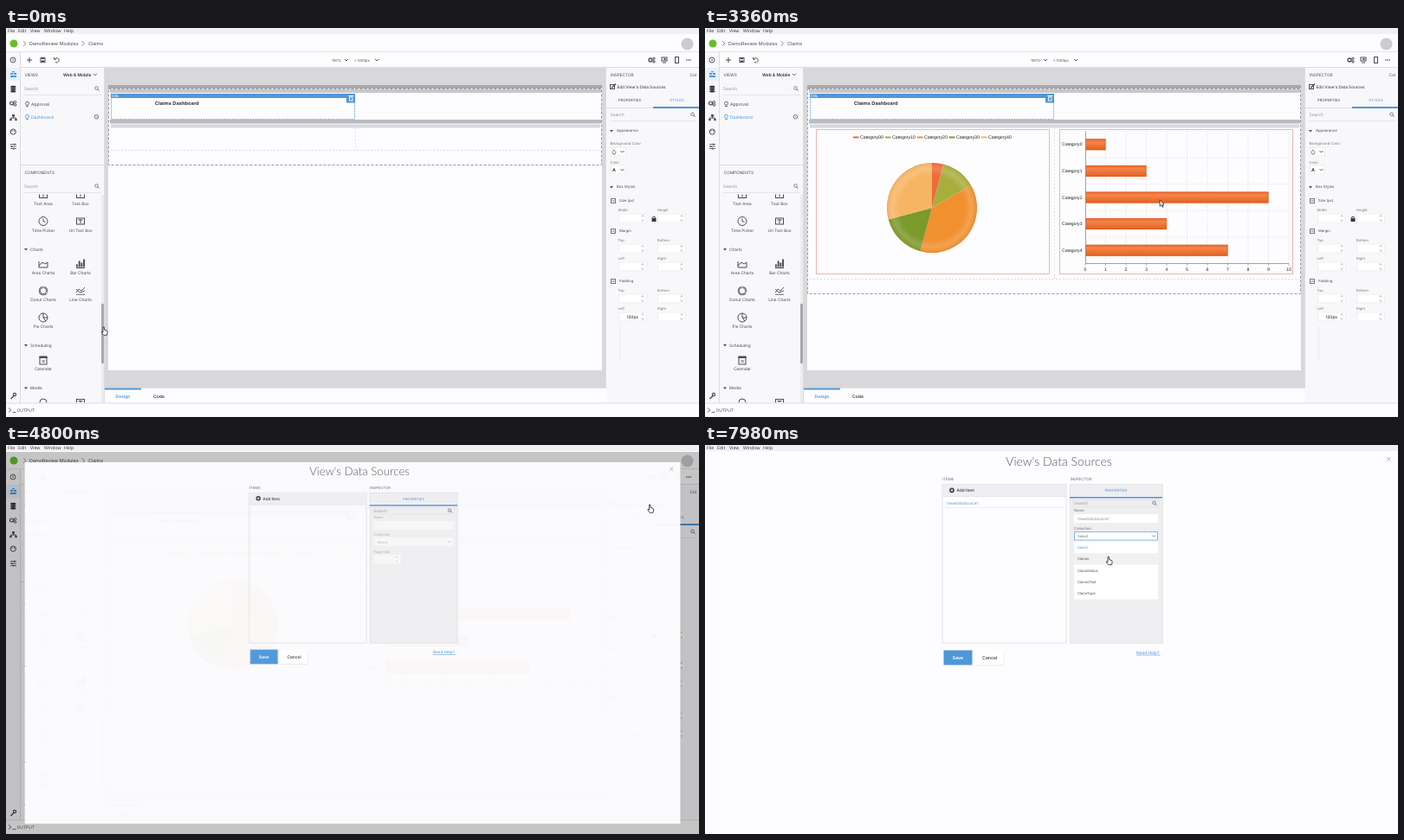
An HTML page with a canvas for the animation above (8 s loop, 800x450 px).

```html
<!DOCTYPE html>
<html lang="en">
<head>
<meta charset="utf-8">
<title>Claims dashboard builder</title>
<style>
html, body { margin: 0; width: 100%; height: 100%; overflow: hidden; background: #fdfcfe; }
canvas { display: block; width: 800px; height: 450px; }
</style>
</head>
<body>
<canvas id="stage" width="800" height="450"></canvas>
<script>
const c = document.getElementById('stage').getContext('2d');
const LOOP = 8000, STEP = 60, TAU = Math.PI * 2;
const BLUE = '#4f97d9', INK = '#4c4b50', MID = '#6b6a6f', SOFT = '#98979c', LINE = '#dddce0', PAPER = '#fdfcfe', PANEL = '#f8f7f9';
const UI = 'Inter, sans-serif', PLAIN = '"Liberation Sans", Arial, sans-serif';
c.textRendering = 'geometricPrecision';

// ---------- helpers ----------
function rect(x, y, w, h, fill) { c.fillStyle = fill; c.fillRect(x, y, w, h); }

function frame(x, y, w, h, col, dash = [], lw = 1) {
  c.strokeStyle = col; c.lineWidth = lw; c.setLineDash(dash);
  c.strokeRect(x + .5, y + .5, w - 1, h - 1);
  c.setLineDash([]);
}

function path(pts, col = INK, lw = 1, dash = []) {
  c.strokeStyle = col; c.lineWidth = lw; c.setLineDash(dash);
  c.beginPath();
  for (let i = 0; i < pts.length; i += 2) c.lineTo(pts[i], pts[i + 1]);
  c.stroke();
  c.setLineDash([]);
}

function disc(x, y, r, fill, stroke, lw = 1) {
  c.beginPath(); c.arc(x, y, r, 0, TAU);
  if (fill) { c.fillStyle = fill; c.fill(); }
  if (stroke) { c.strokeStyle = stroke; c.lineWidth = lw; c.stroke(); }
}

function text(s, x, y, size = 4.8, col = INK, align = 'left', weight = 400, font = UI) {
  c.font = `${weight} ${size}px ${font}`;
  c.textAlign = align; c.textBaseline = 'middle'; c.fillStyle = col;
  c.fillText(s, x, y + .2);
}

const down = (x, y, col = INK) => path([x - 2, y - 1, x, y + 1, x + 2, y - 1], col, .9);
const right = (x, y) => path([x - 1.5, y - 3, x + 1.5, y, x - 1.5, y + 3], '#77767a', .8);

function caret(x, y) {
  c.fillStyle = INK;
  c.beginPath(); c.moveTo(x - 2, y - 1); c.lineTo(x + 2, y - 1); c.lineTo(x, y + 1.4); c.fill();
}

function lens(x, y) {
  disc(x - .5, y - .5, 1.8, null, '#66656a', .8);
  path([x + .8, y + .8, x + 2.6, y + 2.6], '#66656a', .9);
}

function search(x, y, iconX) {
  text('Search', x, y, 4.9, SOFT);
  lens(iconX, y);
}

function spinner(x, y) {
  path([x - 1.5, y - 2, x, y - 3.3, x + 1.5, y - 2], '#8b8a8e', .7);
  path([x - 1.5, y + 2, x, y + 3.3, x + 1.5, y + 2], '#8b8a8e', .7);
}

function plusDisc(x, y) {
  disc(x, y, 2.9, '#38373b');
  path([x - 1.7, y, x + 1.7, y], '#fff', .8);
  path([x, y - 1.7, x, y + 1.7], '#fff', .8);
}

// ---------- shell ----------
function menuBar() {
  rect(0, 0, 800, 7, '#f0eff1');
  [['File', 2], ['Edit', 14], ['View', 28], ['Window', 44], ['Help', 67]]
    .forEach(([s, x]) => text(s, x, 3.2, 5.2, '#333', 'left', 400, '"Open Sans", sans-serif'));
}

function topBars() {
  rect(0, 8, 800, 37, PAPER);
  disc(9, 18, 4.5, '#67bf2b');
  right(21.5, 18); right(89, 18);
  text('DemoReview Modules', 27, 18, 5.4);
  text('Claims', 95, 18, 5.4);
  disc(786.5, 18.5, 7, '#cccbce');
  rect(0, 27, 800, 1, '#e4e3e6');
  rect(0, 45, 800, 1, LINE);
  path([24, 37, 30, 37]); path([27, 34, 27, 40]);
  frame(39.5, 34, 6, 6, INK); rect(41, 34, 3, 2, INK); rect(41, 37.5, 3, 2, INK);
  c.strokeStyle = INK; c.lineWidth = .9;
  c.beginPath(); c.arc(58.5, 37.3, 2.7, -2.6, 2.2); c.stroke();
  path([55.5, 33.8, 55.7, 36.3, 58, 36.3], INK, .9);
  text('100%', 376, 37.3, 4.2); down(393, 37);
  text('⌖ 1200px', 402, 37.3, 4.2); down(428, 37);
  disc(744, 37, 2, null, INK, 1.3); disc(748, 35.3, 1.2, null, INK); disc(748, 39, 1.2, null, INK);
  frame(756.5, 33.5, 7, 5, INK); rect(758, 39.5, 4, 1, INK); rect(759.5, 35, 2, 2, INK);
  frame(772, 33, 5, 8, INK);
  for (let i = 0; i < 3; i++) disc(785.8 + i * 2.2, 37, .8, INK);
}

function rail() {
  rect(0, 28, 17, 406, PANEL);
  rect(0, 46, 16, 15, '#e8f0f8');
  rect(16, 28, 1, 406, LINE);
  disc(8, 37, 3, null, INK, .9); text('?', 8, 37, 4.6, INK, 'center', 700);
  rect(5, 52, 3, 2, BLUE); rect(9, 52, 3, 2, BLUE); rect(5, 55, 7, 2, BLUE); rect(7, 50, 3, 1.3, BLUE);
  for (let i = 0; i < 3; i++) {
    c.fillStyle = '#38373b';
    c.beginPath(); c.ellipse(8.3, 68 + i * 2.6, 3.2, 1.3, 0, 0, TAU); c.fill();
  }
  disc(6.5, 87, 2, null, INK, 1.2); disc(10.5, 85.7, 1.3, null, INK); disc(10.5, 89, 1.3, null, INK);
  rect(7, 100, 3, 2.5, INK); path([8.5, 102, 8.5, 104]); path([5.5, 106, 5.5, 104, 11.5, 104, 11.5, 106]);
  rect(4.3, 105, 2.4, 2.2, INK); rect(10.3, 105, 2.4, 2.2, INK);
  disc(8.3, 120, 3.1, null, INK); disc(7, 119, .7, INK); disc(9.6, 119, .7, INK);
  for (let i = 0; i < 3; i++) {
    path([5, 134.5 + i * 2.5, 12, 134.5 + i * 2.5], INK, .8);
    rect([9, 6, 8][i], 133.7 + i * 2.5, 1.4, 1.8, INK);
  }
  path([5.5, 429, 9.5, 425], INK, 1.5); disc(10, 424, 1.6, null, INK, 1.2);
}

const ICONS = {
  area(x, y) { path([x - 5, y - 3, x - 5, y + 4, x + 5, y + 4, x + 5, y - 2, x + 2, y, x - 1, y - 2, x - 5, y + 2]); },
  bars(x, y) { [3, 7, 5, 9].forEach((h, i) => rect(x - 5 + i * 2.7, y + 3.5 - h, 1.9, h, INK)); path([x - 5, y + 4.5, x + 5, y + 4.5]); },
  donut(x, y) { disc(x, y, 4.2, null, INK, 2.2); disc(x, y, 4.2, null, PANEL, .6); path([x, y - 5.5, x, y - 3], PANEL, .8); path([x + 3, y + 1, x + 5, y + 3], PANEL, .8); },
  lines(x, y) { path([x - 5, y + 2, x - 2, y - 2, x + 1, y, x + 5, y - 4], INK, .9); path([x - 5, y - 2, x - 1, y + 2, x + 5, y], INK, .9); path([x - 5, y + 4.3, x + 5, y + 4.3], INK, .8); },
  pie(x, y) { disc(x, y, 5, null, INK); path([x, y - 5, x, y, x + 5, y]); path([x, y, x + 3, y + 4]); },
  clock(x, y) { disc(x, y, 5, null, INK); path([x, y - 3, x, y, x + 2.5, y + 1]); },
  box(x, y) { frame(x - 5, y - 4, 10, 8, INK); rect(x - 2.5, y - 2, 5, 1, INK); rect(x - .5, y - 2, 1, 4.5, INK); },
  cal(x, y) { frame(x - 4.5, y - 4.5, 9, 10, INK); rect(x - 4.5, y - 4, 9, 2, INK); text('12', x, y + 1.8, 4, INK, 'center', 600); },
  photo(x, y) { disc(x, y, 4, null, INK); },
};

const TILES = [
  ['Text Area', 'box', 43, 193], ['Text Box', 'box', 86, 193],
  ['Time Picker', 'clock', 43, 223.5], ['Uri Text Box', 'box', 86, 223.5],
  ['Area Charts', 'area', 43, 273], ['Bar Charts', 'bars', 86, 273],
  ['Donut Charts', 'donut', 43, 304], ['Line Charts', 'lines', 86, 304],
  ['Pie Charts', 'pie', 43, 335], ['Calendar', 'cal', 43, 384],
  ['', 'photo', 43, 433], ['', 'box', 86, 433],
];

function leftPanel(hot) {
  rect(17, 46, 97, 388, PANEL);
  text('VIEWS', 21.5, 54, 4.8);
  text('Web & Mobile', 66, 54, 4.9, '#333', 'left', 600);
  down(103, 53.8);
  search(21, 70, 105);
  rect(20, 77, 90, 1, '#e6e5e8');
  [[88, 'Approval', INK], [103, 'Dashboard', BLUE]].forEach(([y, s, col]) => {
    disc(24.5, y - .8, 2, null, col, .8); path([23, y + 2.5, 26, y + 2.5], col, .8);
    text(s, 29, y, 5, col);
  });
  disc(104.5, 102.7, 2.3, null, '#77767a', 1);
  disc(104.5, 102.7, .6, '#77767a');
  rect(17, 158, 97, 1, LINE);
  text('COMPONENTS', 21.5, 167, 4.8);
  search(21, 183, 105);
  rect(20, 190, 90, 1, '#e6e5e8');

  c.save();
  c.beginPath(); c.rect(17, 192.5, 96, 241); c.clip();
  TILES.forEach(([name, icon, x, y]) => {
    if (name && name === hot) rect(x - 22, y - 11, 44, 31, '#e5e4e7');
    ICONS[icon](x, y);
    text(name, x, y + 10.6, 4.75, INK, 'center');
  });
  [['Charts', 256], ['Scheduling', 367], ['Media', 416.5]].forEach(([s, y]) => {
    caret(23, y); text(s, 28, y, 4.7);
  });
  c.restore();
  rect(110, 193, 3, 240, '#ecebee');
  rect(110, 319, 3, 69, '#a9a8ac');
  rect(113, 46, 1, 388, LINE);
}

function field(x, y, val) {
  rect(x, y - 5.5, 33, 11, '#fff');
  frame(x, y - 5.5, 33, 11, '#efeef1');
  spinner(x + 28, y);
  if (val) text(val, x + 23, y, 4.8, '#333', 'right', 500);
}

function inspector(linkHot) {
  rect(693, 46, 107, 388, PANEL);
  rect(692, 46, 1, 388, LINE);
  text('INSPECTOR', 698, 54, 4.7);
  text('Col', 797, 54, 4.8, INK, 'right');
  const col = linkHot ? BLUE : INK;
  frame(697, 65, 6, 6, col); path([699, 69.5, 704, 64.5], col, 1.2);
  text("Edit View's Data Sources", 705.5, 68, 4.7, col, 'left', 500);
  if (linkHot) rect(705.5, 70.8, 56, .6, BLUE);
  text('PROPERTIES', 720, 84, 4.3, INK, 'center');
  text('STYLES', 774.5, 84, 4.3, BLUE, 'center');
  rect(693, 92, 107, 1, LINE); rect(747, 91, 53, 2, BLUE);
  search(697.5, 100.3, 793);
  rect(697, 107, 100, 1, '#e6e5e8');
  caret(699, 119); text('Appearance', 705, 119, 4.3);
  text('Background Color', 697.5, 134, 4.2, '#77767a');
  text('Color', 697.5, 156, 4.2, '#77767a');
  [143, 164].forEach(y => { rect(698, y - 5.5, 18, 11, '#fff'); frame(698, y - 5.5, 18, 11, '#ecebee'); down(711.5, y); });
  path([702, 141, 704, 143.5, 703, 146, 701, 146, 700, 143.5, 702, 141], INK, .7);
  text('A', 702, 164, 5.2, '#333', 'center', 700);
  caret(699, 184); text('Box Styles', 705, 184, 4.3);
  [['Size (px)', 200, 'Width', 'Height'], ['Margin', 235, 'Top', 'Bottom'], ['Padding', 293, 'Top', 'Bottom']]
    .forEach(([s, y, a, b], i) => {
      frame(698, y - 3, 6, 6, '#77767a'); rect(699.5, y - .5, 3, 1, '#77767a');
      text(s, 708, y, 4.2);
      for (let k = 0; k < (i ? 2 : 1); k++) {
        const ly = y + 11 + k * 21;
        text(k ? 'Left' : a, 706.5, ly, 4.1, '#77767a');
        text(k ? 'Right' : b, 752, ly, 4.1, '#77767a');
        field(707, ly + 9, i === 2 && k ? '120px' : '');
        field(752, ly + 9);
      }
    });
  rect(745.5, 220, 5, 4, '#38373b');
  c.strokeStyle = '#38373b'; c.lineWidth = 1;
  c.beginPath(); c.arc(748, 219.8, 1.6, Math.PI, 0); c.stroke();
  rect(708, 345, 1, 40, '#ebeaed');
}

function footer() {
  rect(114, 416, 579, 18, PAPER);
  rect(114, 416, 579, 1, '#e4e3e6');
  rect(114, 416.5, 42, 2, BLUE);
  text('Design', 135, 426, 5, BLUE, 'center', 600);
  text('Code', 176.5, 426, 5, '#333', 'center', 600);
  rect(0, 434, 800, 16, PAPER);
  rect(0, 433.5, 800, 1, LINE);
  path([3, 439.5, 6, 442, 3, 444.5], INK, .8); rect(7.5, 444, 4, .8, INK);
  text('OUTPUT', 12.5, 442.3, 4.9);
}

// ---------- charts ----------
const VALUES = [1, 3, 9, 4, 7];
const TINTS = ['#ee6b3b', '#a8ae3d', '#f0902f', '#7c992b', '#f6b563'];

function chartBox(x) {
  rect(x, 117, 270, 168, PAPER);
  frame(x, 117, 270, 168, '#edb5b3');
}

function pieChart() {
  chartBox(128);
  const x = 262, y = 208, r = 52, total = VALUES.reduce((a, b) => a + b);
  let a = -Math.PI / 2;
  VALUES.forEach((v, i) => {
    const end = a + v / total * TAU;
    c.fillStyle = TINTS[i];
    c.beginPath(); c.moveTo(x, y); c.arc(x, y, r, a, end); c.fill();
    a = end;
    const lx = 171 + i * 37;
    rect(lx, 125.5, 6.5, 2, TINTS[i]);
    text(`Category${i}0`, lx + 8, 126.5, 5.2, '#222', 'left', 400, PLAIN);
  });
  const g = c.createRadialGradient(x, y, 0, x, y, r);
  g.addColorStop(.72, 'rgba(255,255,255,0)');
  g.addColorStop(.88, 'rgba(255,255,255,.17)');
  g.addColorStop(.95, 'rgba(255,255,255,.05)');
  g.addColorStop(1, 'rgba(150,70,0,.2)');
  disc(x, y, r, g);
}

function barChart() {
  chartBox(409);
  const x0 = 439, unit = 23.5, top = 119.5, gap = 30.6, base = top + 5 * gap;
  for (let i = 0; i <= 10; i++) {
    const x = x0 + i * unit;
    if (i) path([x, top, x, base], '#e3e2e5', .7, [2, 1]);
    path([x, base, x, base + 2], '#888', .7);
    text(i, x, 279, 5.2, '#222', 'center', 400, PLAIN);
  }
  VALUES.forEach((v, i) => {
    const y = top + (i + .5) * gap;
    path([x0, y + gap / 2, x0 + 235, y + gap / 2], '#e3e2e5', .7, [2, 1]);
    const g = c.createLinearGradient(0, y - 6.5, 0, y + 6.5);
    g.addColorStop(0, '#e9662a'); g.addColorStop(.3, '#f6854a'); g.addColorStop(1, '#e35f1f');
    rect(x0, y - 6.5, v * unit, 13, g);
    frame(x0, y - 6.5, v * unit, 13, '#d95a1f', [], .6);
    text(`Category${i}`, 435.5, y, 5.1, '#222', 'right', 400, PLAIN);
  });
  path([x0 + .5, top, x0 + .5, base, x0 + 235, base], '#8c8b8f', .8);
}

function design(t) {
  rect(114, 46, 579, 370, '#d8d7d9');
  rect(118, 66, 570, 330, PAPER);
  const hasPie = t >= PIE_DROP, bottom = hasPie ? 290 : 141;
  rect(118, 66, 570, 4, '#a8a7ab');
  rect(120, 71, 567, 4, '#c8c7cd');
  rect(120, 106, 567, 4.5, '#bbbac0');
  rect(121, 111.5, 565, 4, '#d6d8e0');
  if (t >= 840 && t < PIE_DROP) {
    [['VIEW', 68.2], ['ROW', 73.2], ['ROW', 108.4], ['CELL', 113.6]].forEach(([s, y]) => text(s, 121.5, y, 4, '#f7f6f9', 'left', 600));
  }
  frame(118, 70, 570, bottom - 52, '#9b9a9f', [3, 2]);
  path([121, bottom + .5, 686, bottom + .5], '#d2d1d5', .8, [2, 2]);
  path([403.5, 116, 403.5, bottom], '#d8d7da', .8, [2, 2]);
  frame(121, 76, 282, 30, '#7fb2e2', [2, 1]);
  rect(121, 76, 282, 5, BLUE);
  text('COL', 122, 78.5, 4, '#fff', 'left', 600);
  rect(393, 76, 10, 10.5, BLUE);
  frame(396, 79.5, 4.5, 5, '#fff', [], .9); rect(395.3, 78, 6, 1, '#fff');
  text('Claims Dashboard', 172, 86.8, 5.7, '#333', 'left', 700);
  if (hasPie) pieChart();
  if (t >= BAR_DROP) barChart();
  else if (t >= 2220) frame(119, 109, 569, 182, '#72abe2');
}

// ---------- dialog ----------
const OPTIONS = ['Select', 'Claims', 'ClaimStatus', 'ClaimsTest', 'ClaimType'];

function dialog(t, cur) {
  const added = t >= 5880;
  rect(0, 8, 800, 442, PAPER);
  text("View's Data Sources", 408.5, 19.3, 14, '#57565a', 'center', 300, 'Lato, sans-serif');
  path([787, 14, 791.5, 18.5], '#a3a2a6', .8); path([791.5, 14, 787, 18.5], '#a3a2a6', .8);
  text('ITEMS', 274, 39.3, 4.4, MID); text('INSPECTOR', 421.5, 39.3, 4.4, MID);

  frame(273.5, 45, 144, 184.5, '#e4e3e6');
  rect(274, 45.5, 143, 14, '#efeef0');
  rect(274, 59, 143, 1, '#e6e5e8');
  plusDisc(285, 52.3);
  text('Add Item', 290.5, 52.5, 4.8, '#333', 'left', 500);
  if (added) {
    text('ViewDataSource1', 279, 67, 4.4, BLUE);
    rect(274, 72, 143, 1, '#efeef1');
  }

  rect(421, 45, 107.5, 184.5, '#efeef0');
  frame(421, 45, 107.5, 184.5, '#e4e3e6');
  text('PROPERTIES', 474.5, 52.8, 4.3, BLUE, 'center');
  rect(421, 60, 107, 1.5, BLUE);
  frame(424, 63, 101, 9, '#e6e5e8');
  search(426, 67.3, 519);

  const alpha = c.globalAlpha;
  if (!added) c.globalAlpha = alpha * .5;
  text('Name', 426, 75.8, 4.2, MID); text('Collection', 426, 96.7, 4.2, MID); text('Page Size', 426, 117.7, 4.2, MID);
  rect(426, 80, 97, 10, '#fff');
  rect(426, 100, 97, 10.5, '#fff');
  rect(426, 121, 33, 11, '#fff');
  text('Select', 430, 105.6, 4.2, MID);
  down(518, 105.3, BLUE);
  spinner(454, 126.5);
  if (added) {
    text('ViewDataSource1', 430, 85, 4.4, '#8b8a8e');
    text('20', 448, 126.7, 4.8, '#222', 'right', 500);
  }
  c.globalAlpha = alpha;
  if (t >= 6660) frame(426, 100, 97, 10.5, '#68a8e2', [], .8);

  if (!added) rect(274.5, 236.3, 35, 19, '#b9d7f2');
  rect(275.5, 237.5, 33, 17, BLUE);
  text('Save', 292, 246.2, 5.2, '#fff', 'center', 700);
  rect(312.5, 239, 33, 16.3, '#e9e8eb');
  rect(312, 238, 33, 16.3, '#fff');
  text('Cancel', 328.7, 246.2, 5.2, '#333', 'center', 500);
  text('Need Help?', 498, 240.3, 4.8, BLUE);
  rect(498, 242.7, 27.5, .6, BLUE);

  if (t >= 6900) {
    rect(426, 111.5, 97, 67, '#fff');
    const hot = cur.y > 125 ? 1 : -1;
    OPTIONS.forEach((s, i) => {
      const y = 118.4 + i * 13.35;
      if (i === hot) rect(426, y - 6.6, 97, 13.3, '#f1f0f2');
      text(s, 430, y, 4.2, i ? INK : BLUE);
    });
  }
}

// ---------- pointer ----------
const PIE_DROP = 1500, BAR_DROP = 3000, OPEN = 4700;
const ROUTE = [
  [0, 112, 346], [180, 112, 346], [660, 43, 338], [840, 43, 338],
  [1320, 191, 126], [1440, 205, 148], [1560, 205, 148], [1920, 86, 274], [2040, 86, 274],
  [2460, 383, 206], [2820, 520, 200], [3240, 520, 200], [3780, 560, 190], [3960, 560, 190],
  [4500, 742.5, 69], [5160, 742.5, 69], [5700, 298, 49], [5940, 298, 49],
  [6600, 500.5, 108], [7440, 500.5, 108], [7860, 465, 129.3], [LOOP, 465, 129.3],
];

function pointerAt(t) {
  const i = ROUTE.findIndex(k => k[0] > t);
  const [t0, x0, y0] = ROUTE[i - 1], [t1, x1, y1] = ROUTE[i];
  const p = (t - t0) / (t1 - t0), e = p * p * (3 - 2 * p);
  return { x: x0 + (x1 - x0) * e, y: y0 + (y1 - y0) * e };
}

function shape(pts, x, y) {
  c.beginPath();
  for (let i = 0; i < pts.length; i += 2) c.lineTo(x + pts[i], y + pts[i + 1]);
  c.closePath();
  c.fillStyle = '#fff'; c.fill();
  c.strokeStyle = '#222'; c.lineWidth = .8; c.stroke();
}

function pointer(t, { x, y }) {
  const drag = (t >= 840 && t < PIE_DROP) || (t >= 2040 && t < BAR_DROP);
  const overPage = t < OPEN && x > 114 && x < 693;
  const free = (t > 5220 && t < 5580) || (t > 6060 && t < 6480);
  if (drag || overPage || free) {
    shape([0, 0, 0, 7.5, 1.8, 6, 3, 8.5, 4, 8, 3, 5.5, 5, 5.3], x, y);
    if (drag) {
      rect(x + 1.5, y + 5.5, 5, 4.5, '#fff');
      frame(x + 1, y + 5, 5.5, 5, '#222', [], .9);
    }
  } else {
    shape([0, 0, 1.3, 0, 1.7, 3.4, 4.6, 4.3, 5.2, 6, 4.4, 9.3, .8, 9.3, -1.8, 6, -1.3, 5.2, 0, 6.2], x, y);
  }
}

// ---------- main ----------
function draw(t) {
  const cur = pointerAt(t);
  let hot = '';
  if (t >= 540 && t < PIE_DROP) hot = 'Pie Charts';
  else if (t >= 1860 && t < BAR_DROP) hot = 'Bar Charts';
  c.globalAlpha = 1;
  rect(0, 0, 800, 450, PAPER);
  const p = Math.min(1, Math.max(0, (t - OPEN) / 220));
  if (p < 1) {
    topBars(); rail(); leftPanel(hot); design(t);
    inspector(t >= 4380); footer();
  }
  if (p > 0) {
    const e = 1 - (1 - p) ** 3, s = 1 - (1 - e) / 3;
    rect(0, 8, 800, 442, `rgba(0,0,0,${.22 * Math.min(1, p * 2.4)})`);
    c.save();
    c.globalAlpha = Math.min(1, p * 2.12);
    c.translate(400.5, 229); c.scale(s, s); c.translate(-400.5, -229);
    dialog(t, cur);
    c.restore();
  }
  menuBar();
  pointer(t, cur);
}

function tick(now) {
  draw(Math.floor((now % LOOP) / STEP) * STEP);
  requestAnimationFrame(tick);
}
requestAnimationFrame(tick);
</script>
</body>
</html>
```
